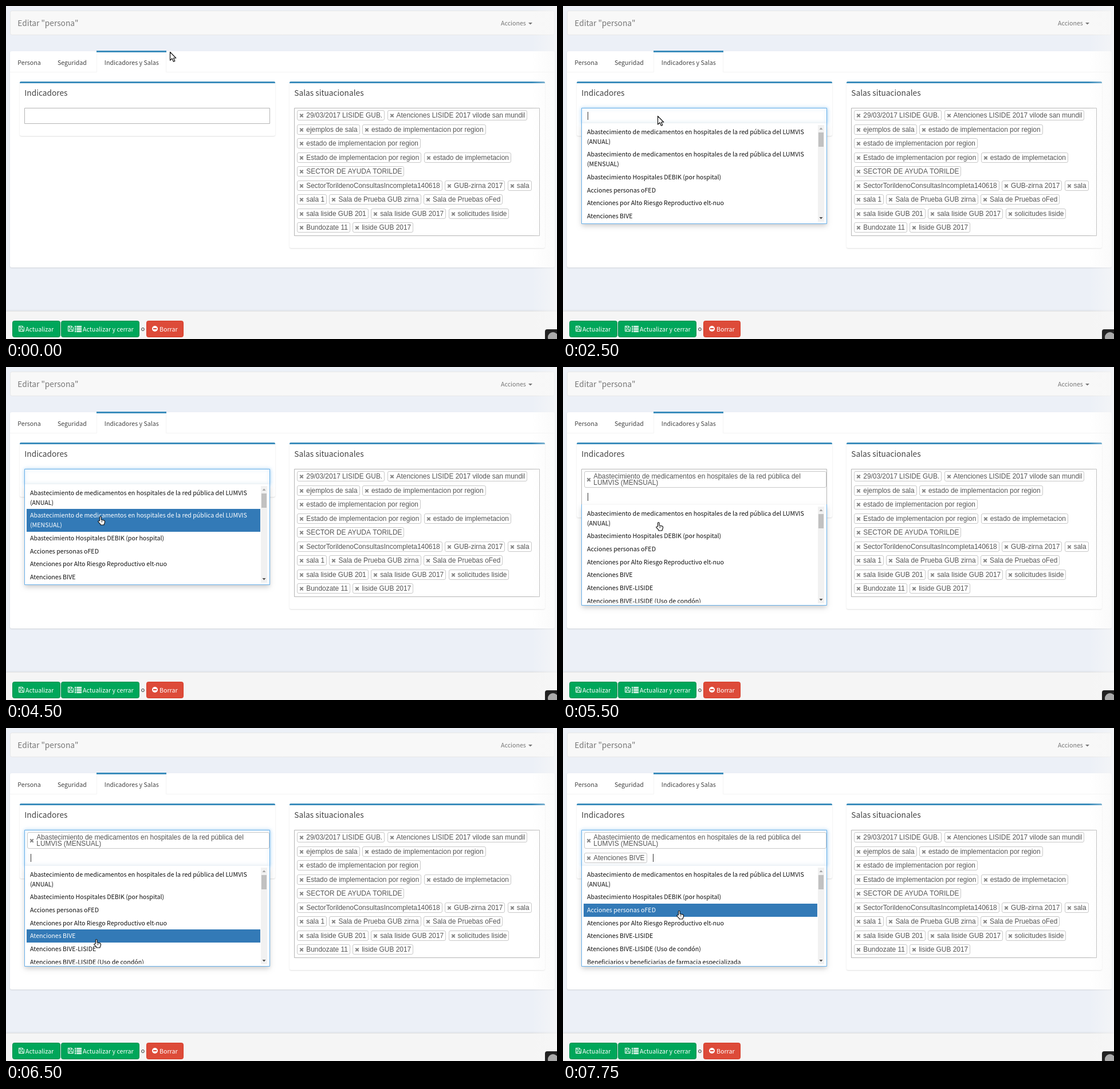
These frames come from a looping animation (962x582 px, 8 s). An HTML page with a canvas:

```html
<!DOCTYPE html>
<html lang="es">
<head>
<meta charset="utf-8">
<title>Editar</title>
<style>
  html, body { margin: 0; width: 100%; height: 100%; overflow: hidden; background: #ecf0f5; }
  canvas { display: block; width: 962px; height: 582px; }
</style>
</head>
<body>
<canvas id="stage" width="962" height="582"></canvas>
<script>
const ctx = document.getElementById('stage').getContext('2d');
const W = 962, H = 582, LOOP = 8000;
const UI = '"Noto Sans CJK JP", "Noto Sans CJK SC", "Noto Sans CJK", sans-serif';
const SMALL = `10.65px ${UI}`, TITLE = `13.7px ${UI}`;
const TAG = '11.9px "Liberation Sans", Arial, sans-serif';
const BLUE = '#3c8dbc', FOCUS = '#66afe9';

const rooms = [
  ['29/03/2017 LISIDE GUB.', 'Atenciones LISIDE 2017 vilode san mundil'],
  ['ejemplos de sala', 'estado de implementacion por region'],
  ['estado de implementacion por region'],
  ['Estado de implementacion por region', 'estado de implemetacion'],
  ['SECTOR DE AYUDA TORILDE'],
  ['SectorTorildenoConsultasIncompleta140618', 'GUB-zirna 2017', 'sala'],
  ['sala 1', 'Sala de Prueba GUB zirna', 'Sala de Pruebas oFed'],
  ['sala liside GUB 201', 'sala liside GUB 2017', 'solicitudes liside'],
  ['Bundozate 11', 'liside GUB 2017']
];

const supply = 'Abastecimiento de medicamentos en hospitales de la red pública del';
const MONTHLY = 1, CARE = 5;
const options = [
  [supply + ' LUMVIS', '(ANUAL)'],
  [supply + ' LUMVIS', '(MENSUAL)'],
  ['Abastecimiento Hospitales DEBIK (por hospital)'],
  ['Acciones personas oFED'],
  ['Atenciones por Alto Riesgo Reproductivo elt-nuo'],
  ['Atenciones BIVE'],
  ['Atenciones BIVE-LISIDE'],
  ['Atenciones BIVE-LISIDE (Uso de condón)'],
  ['Beneficiarios y beneficiarias de farmacia especializada']
];

// Stepped tracks: each row holds from its time until the next one
const pointerTrack = [
  [0, 'arrow', 286, 80], [250, 'arrow', 257, 89], [500, 'arrow', 226, 95],
  [750, 'arrow', 205, 98], [1000, 'hand', 199, 99], [1500, 'beam', 213, 193],
  [1750, 'beam', 184, 194], [2000, 'beam', 168, 196], [2500, 'arrow', 165, 192],
  [4500, 'hand', 160, 261], [4750, 'hand', 158, 282], [5000, 'hand', 158, 286],
  [5250, 'hand', 162, 271], [6000, 'hand', 160, 299], [6500, 'hand', 153, 369],
  [7500, 'hand', 175, 336], [7750, 'hand', 198, 319]
];
const hoverTrack = [[0, -1], [4500, 1], [5500, -1], [6000, 0], [6500, 4], [7500, 3], [7750, 2]];
const caretTrack = [[0, false], [2500, true], [3000, false], [3500, true], [4250, false], [5000, true]];
const focusTrack = [[0, false], [2500, true], [5500, false], [5750, true], [7250, false], [7500, true]];

const at = (track, t) => track.filter(row => row[0] <= t).pop();

const shapes = {
  arrow: new Path2D('M.5.5V15L4 11.8 6.4 17.2 8.8 16.2 6.5 11H10.8Z'),
  hand: new Path2D('M3.5 8V1.8a1.3 1.3 0 0 1 2.6 0V6l4.5.9q2 .4 2 2.3l-.6 3q-.3 1-1 1.8v1H5v-1.2L1 9.6Q.4 8.2 1.9 8z'),
  beam: new Path2D('M-3-6.5H-1L0-5.5 1-6.5H3M-3 6.5H-1L0 5.5 1 6.5H3M0-5.5V5.5')
};

function rect(x, y, w, h, fill) {
  ctx.fillStyle = fill;
  ctx.fillRect(x, y, w, h);
}

function box(x, y, w, h, r, fill, stroke) {
  ctx.beginPath();
  ctx.roundRect(x, y, w, h, r);
  if (fill) { ctx.fillStyle = fill; ctx.fill(); }
  if (stroke) { ctx.strokeStyle = stroke; ctx.lineWidth = 1; ctx.stroke(); }
}

function shadow(color, blur, dy, draw) {
  ctx.save();
  ctx.shadowColor = color;
  ctx.shadowBlur = blur;
  ctx.shadowOffsetY = dy;
  draw();
  ctx.restore();
}

function text(str, x, y, font, color) {
  ctx.font = font;
  ctx.fillStyle = color;
  ctx.fillText(str, x, y);
}

function line(points, color, width) {
  ctx.beginPath();
  points.forEach(([x, y], i) => i ? ctx.lineTo(x, y) : ctx.moveTo(x, y));
  ctx.strokeStyle = color;
  ctx.lineWidth = width;
  ctx.stroke();
}

function triangle(x, y, w, h, color) {
  ctx.beginPath();
  ctx.moveTo(x - w / 2, y);
  ctx.lineTo(x + w / 2, y);
  ctx.lineTo(x, y + h);
  ctx.fillStyle = color;
  ctx.fill();
}

function cross(x, y) {
  line([[x - 2.7, y - 2.7], [x + 2.7, y + 2.7]], '#858585', 2);
  line([[x - 2.7, y + 2.7], [x + 2.7, y - 2.7]], '#858585', 2);
}

// Draws a tag and returns the x where the next one starts
function tag(str, x, y) {
  ctx.font = TAG;
  const end = x + 20 + ctx.measureText(str).width;
  const left = Math.round(x) + .5;
  box(left, y + .5, Math.round(end) - .5 - left, 17, 2.5, '#fff', '#c8c8c8');
  cross(left + 7.5, y + 9.5);
  text(str, x + 16, y + 13, TAG, '#555');
  return end + 4.4;
}

function card(x, bottom, title) {
  shadow('rgba(0,0,0,.12)', 2, 1, () => box(x, 132, 446, bottom - 132, 3, '#fff'));
  box(x, 132, 446, 3, [2, 2, 0, 0], BLUE);
  text(title, x + 8.3, 156.5, TITLE, '#444');
}

function floppy(x, y) {
  line([[x + .5, y + .5], [x + 7, y + .5], [x + 9.5, y + 3], [x + 9.5, y + 9.5], [x + .5, y + 9.5], [x + .5, y]], '#fff', 1);
  line([[x + 2.5, y + 9], [x + 2.5, y + 6], [x + 7.5, y + 6], [x + 7.5, y + 9]], '#fff', 1);
  line([[x + 2.5, y], [x + 2.5, y + 3.5], [x + 6.5, y + 3.5], [x + 6.5, y]], '#fff', 1);
}

function button(x, w, fill, edge, label, labelX) {
  box(x + .5, 550.5, w - 1, 28, 3, fill, edge);
  text(label, labelX, 568.5, SMALL, '#fff');
}

function header() {
  rect(0, 0, W, H, '#ecf0f7');
  box(7.5, 8.5, 950, 42, 3, '#f8f8f8', '#e7e7e7');
  text('Editar "persona"', 20.3, 35, TITLE, '#777');
  text('Acciones', 864, 34, SMALL, '#777');
  triangle(915.5, 29, 7, 3.6, '#777');
}

function tabs() {
  shadow('rgba(0,0,0,.12)', 2, 1, () => box(7, 79, 951, 378, 3, '#fff'));
  rect(7, 115, 951, 1, '#f4f4f4');
  rect(158, 79, 122, 37, '#f4f4f4');
  rect(159, 79, 120, 37, '#fff');
  rect(158, 78, 122, 3, BLUE);
  text('Persona', 20.3, 103, SMALL, '#444');
  text('Seguridad', 90, 103, SMALL, '#444');
  text('Indicadores y Salas', 171.8, 103, SMALL, '#444');
}

function roomCard() {
  card(495, 423, 'Salas situacionales');
  box(503.5, 178.5, 428, 223, 0, '#fff', '#b5b5b5');
  rooms.forEach((row, i) => {
    row.reduce((x, name) => tag(name, x, Math.round(182 + 24.5 * i)), 508.3);
  });
}

function footer() {
  shadow('rgba(0,0,0,.12)', 3, -1, () => rect(0, 534, W, 48, '#f5f5f5'));
  rect(0, 533, W, 1, '#e3e3e3');
  button(11, 84, '#00a65a', '#008d4c', 'Actualizar', 34);
  floppy(22, 559);
  button(96, 137, '#00a65a', '#008d4c', 'Actualizar y cerrar', 134);
  floppy(108, 559);
  for (let y = 559; y < 570; y += 3) {
    rect(120, y, 2, 2, '#fff');
    rect(123, y, 9, 2, '#fff');
  }
  text('o', 235.8, 567.5, SMALL, '#333');
  button(245, 65, '#dd4b39', '#d73925', 'Borrar', 268);
  box(255, 559, 10, 10, 5, '#fff');
  rect(257, 563, 6, 2, '#dd4b39');
}

function edgeFade() {
  const fade = ctx.createLinearGradient(918, 0, W, 0);
  fade.addColorStop(0, 'rgba(247,247,247,0)');
  fade.addColorStop(1, 'rgba(247,247,247,.65)');
  rect(918, 0, W - 918, H, fade);
  box(941, 565, 30, 30, 4, '#222');
  box(946, 570, 18, 18, 9, '#aaa');
}

function dropdown(top, items, hover) {
  const listTop = top + .5, bottom = top + 172;
  shadow('rgba(0,0,0,.2)', 9, 4, () => box(32.5, top - 3, 428, bottom - top + 3.5, [0, 0, 3, 3], '#fff'));
  line([[32.5, top - 4], [32.5, bottom + .5], [460.5, bottom + .5], [460.5, top - 4]], FOCUS, 1);
  ctx.save();
  ctx.beginPath();
  ctx.rect(33, listTop, 412, 168);
  ctx.clip();
  let y = listTop;
  items.forEach((lines, i) => {
    const h = lines.length > 1 ? 39.7 : 22.75;
    const y0 = Math.round(y);
    if (i === hover) rect(36, y0, 408, Math.round(y + h) - y0, '#337ab7');
    lines.forEach((s, k) => text(s, 42, y0 + 15 + 17 * k, SMALL, i === hover ? '#fff' : '#111'));
    y += h;
  });
  ctx.restore();
  rect(445, top, 11, 169, '#f1f1f1');
  rect(446, top + 13, 9, 25, '#c1c1c1');
  triangle(450.5, top + 8, 6, -3.5, '#a3a3a3');
  triangle(450.5, top + 161, 6, 3.5, '#505050');
}

function picker(t) {
  const first = t >= 5500, second = t >= 7250;
  const shift = first ? 36 : 0;
  const focused = at(focusTrack, t)[1];
  card(24, 227 + shift, 'Indicadores');
  const field = () => box(32.5, 178.5, 428, 27 + shift, 0, '#fff', focused ? FOCUS : '#b5b5b5');
  if (focused) shadow('rgba(102,175,233,.6)', 6, 0, field);
  else field();
  if (t >= 2500) {
    const items = options.filter((_, i) => !(first && i === MONTHLY) && !(t >= 7500 && i === CARE));
    dropdown(208 + shift, items, at(hoverTrack, t)[1]);
  }
  if (first) {
    box(37.5, 182.5, 422, 28, 2.5, '#fff', '#c8c8c8');
    cross(45, 197);
    text(supply, 53.3, 195, TAG, '#555');
    text('LUMVIS (MENSUAL)', 53.3, 206, TAG, '#555');
  }
  if (second) tag(options[CARE][0], 37.3, 218);
  if (at(caretTrack, t)[1]) rect(second ? 157 : 43, 185 + (first ? 35 : 0), 1, 14, '#333');
}

function linkStatus(t) {
  if (t < 1000 || t >= 2000) return;
  ctx.save();
  ctx.globalAlpha = t < 1750 ? 1 : .6;
  box(-.5, 576.5, 188, 12, [0, 3, 0, 0], '#dcdcdc', '#c6c6c6');
  text('localhost/app/admin/edit#tab_3', 4, 589, TAG, '#666');
  ctx.restore();
}

function pointer(t) {
  const [, kind, x, y] = at(pointerTrack, t);
  ctx.save();
  ctx.translate(x, y);
  ctx.lineJoin = 'round';
  if (kind === 'beam') {
    ctx.strokeStyle = '#fff';
    ctx.lineWidth = 3;
    ctx.stroke(shapes.beam);
    ctx.lineWidth = 1.4;
  } else {
    ctx.fillStyle = '#fff';
    ctx.fill(shapes[kind]);
    ctx.lineWidth = 1.2;
  }
  ctx.strokeStyle = '#111';
  ctx.stroke(shapes[kind]);
  if (kind === 'hand') line([[6.5, 8], [6.5, 10.5], [6.5, 8], [8.5, 8.3], [8.5, 10.5]], '#555', .7);
  ctx.restore();
}

function draw(now) {
  const t = now % LOOP;
  header();
  tabs();
  roomCard();
  picker(t);
  footer();
  edgeFade();
  linkStatus(t);
  pointer(t);
}

const start = performance.now();
function tick() {
  draw(performance.now() - start);
  requestAnimationFrame(tick);
}
tick();
</script>
</body>
</html>
```
